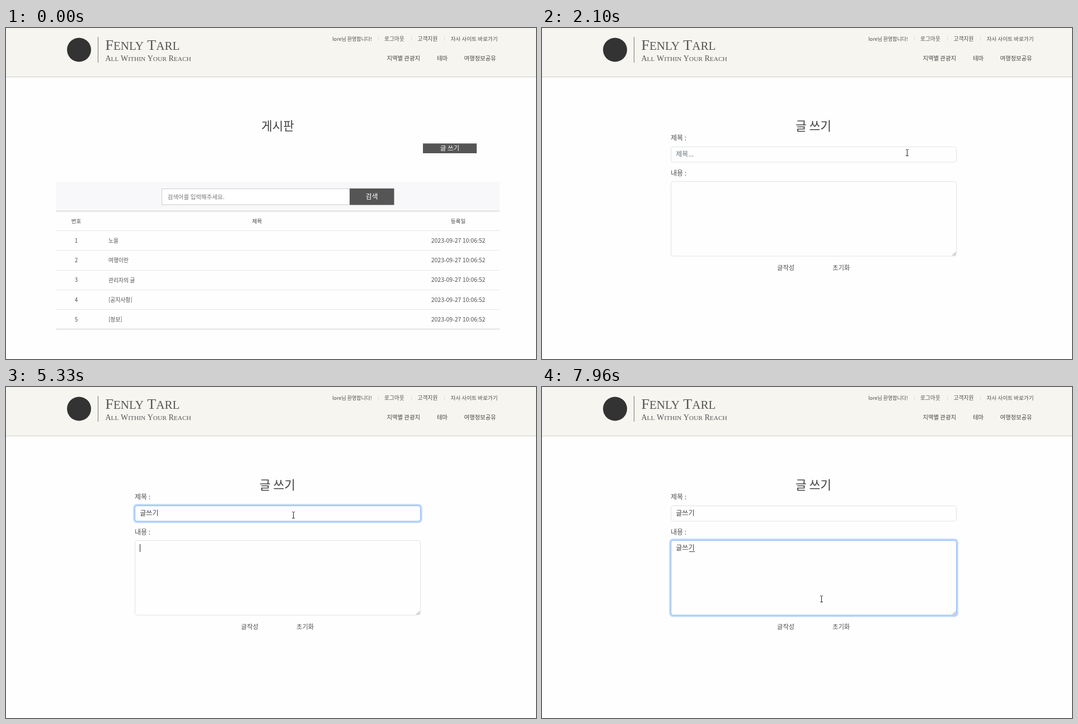
Animation of 947 by 592 pixels, one loop 8 s. Source, as an HTML page with a canvas:

```html
<!DOCTYPE html>
<html lang="ko">
<head>
<meta charset="utf-8">
<title>게시판</title>
<style>
html, body { margin: 0; width: 100%; height: 100%; overflow: hidden; background: #fefefe; }
canvas { display: block; width: 947px; height: 592px; }
</style>
</head>
<body>
<canvas id="stage"></canvas>
<script>
const W = 947, H = 592, LOOP = 8000, STEP = 70;
const KR = '"Noto Sans CJK KR", "Noto Sans CJK", "Noto Sans KR", sans-serif';
const LATIN = '"Noto Sans", "Open Sans", sans-serif';
const SERIF = '"Liberation Serif", "Noto Serif", serif';

const stage = document.getElementById('stage');
const c = stage.getContext('2d');
const dpr = window.devicePixelRatio || 1;
stage.width = W * dpr;
stage.height = H * dpr;

// Moments of the story
const CLICK = 1840, PAGE = 1980, FOCUS = 3230, TAB = 5330;

const titleKeys = [
  [3760, 'ㄱ'], [4190, '그'], [4320, '글'],
  [4520, '글ㅆ'], [4590, '글쓰'], [4660, '글쓱'], [4730, '글쓰기']
];
const bodyKeys = [
  [6200, 'ㄱ'], [6300, '그'], [6400, '글'],
  [6600, '글ㅆ'], [7020, '글쓰'], [7120, '글쓱'], [7220, '글쓰기']
];

const clamp = v => Math.max(0, Math.min(1, v));
const ramp = (t, from, to) => clamp((t - from) / (to - from));
const mix = (a, b, k) => a + (b - a) * k;
const smooth = k => k * k * (3 - 2 * k);
const ticks = (t, from, to) => clamp(Math.floor((t - from) / STEP + 1e-6) * STEP / (to - from));

function typed(keys, t) {
  let value = '';
  for (const [at, s] of keys) if (t >= at) value = s;
  return value;
}

function rect(x, y, w, h, color) {
  c.fillStyle = color;
  c.fillRect(x, y, w, h);
}

function text(s, x, y, size, color = '#505050', align = 'left', weight = 400, family = KR) {
  c.font = `${weight} ${size}px ${family}`;
  c.textAlign = align;
  c.fillStyle = color;
  c.fillText(s, x, y + size * 0.37);
}

function smallCaps(s, x, y, big, small, color) {
  c.textAlign = 'left';
  c.fillStyle = color;
  const run = (part, size) => {
    c.font = `${size}px ${SERIF}`;
    c.fillText(part, x, y);
    x += c.measureText(part).width;
  };
  for (const word of s.toUpperCase().split(' ')) {
    run(word[0], big);
    run(word.slice(1), small);
    x += big * 0.25;
  }
}

function round(x, y, w, h, r) {
  c.beginPath();
  c.roundRect(x, y, w, h, r);
}

function header() {
  rect(0, 0, W, 87, '#f7f5f0');
  rect(0, 87, W, 1, '#cbcac8');
  c.fillStyle = '#333';
  c.beginPath();
  c.arc(130.5, 39, 21.5, 0, 7);
  c.fill();
  rect(164, 16, 1, 46, '#777');
  smallCaps('Fenly Tarl', 177.5, 38.5, 26, 21, '#555');
  smallCaps('All Within Your Reach', 177.5, 58.5, 14, 11.4, '#585858');

  text('lore님 환영합니다!', 583, 19.5, 9);
  text('로그아웃', 676, 19.5, 9.7);
  text('고객지원', 735.5, 19.5, 9.7);
  text('자사 사이트 바로가기', 794.5, 19.5, 9.65);
  for (const x of [665, 724, 783]) rect(x, 16, 1, 7, '#dedcd8');

  text('지역별 관광지', 680.5, 54.5, 10.35, '#444');
  text('테마', 770, 54.5, 10.35, '#444');
  text('여행정보공유', 818.5, 54.5, 10.35, '#444');
}

function board(hover) {
  const g = Math.round(mix(85, 98, hover));
  text('게시판', 485.5, 175, 21.2, '#404040', 'center', 300);
  rect(745, 206.5, 96, 17.5, `rgb(${g},${g},${g})`);
  text('글 쓰기', 793, 215, 11.5, '#fff', 'center');

  rect(89, 275.5, 793, 52, '#f8f8fa');
  rect(278, 287, 336, 29.5, '#ccc');
  rect(279, 288, 335, 27.5, '#fff');
  text('검색어를 입력해주세요.', 288.5, 302, 10.5, '#777');
  rect(614, 287, 79.5, 29.5, '#555');
  text('검색', 653.5, 301.5, 12, '#fff', 'center');

  rect(89, 327, 793, 1, '#ccc');
  text('번호', 125.5, 345, 9.6, '#444', 'center');
  text('제목', 448.5, 345, 9.6, '#444', 'center');
  text('등록일', 808, 345, 9.6, '#444', 'center');

  ['노을', '여행이란', '관리자의 글', '[공지사항]', '[정보]'].forEach((name, i) => {
    const y = 380 + i * 35.3;
    rect(89, Math.round(362 + i * 35.3), 793, 1, '#e4e8e8');
    text(i + 1, 125.5, y, 10, '#505050', 'center');
    text(name, 183, y + 0.5, 9.8);
    text('2023-09-27 10:06:52', 808, y, 10.45, '#505050', 'center');
  });
  rect(89, 538, 793, 1, '#ccc');
}

function field(y, h, focus) {
  if (focus > 0) {
    const s = 2.7 * focus;
    c.fillStyle = `rgba(13,110,253,${0.27 * focus})`;
    round(230 - s, y - s, 511 + 2 * s, h + 2 * s, 4 + s);
    c.fill();
  }
  c.fillStyle = '#fefefe';
  c.strokeStyle = `rgb(${mix(222, 134, focus)},${mix(226, 183, focus)},${mix(230, 254, focus)})`;
  c.lineWidth = 1;
  round(230.5, y + 0.5, 510, h - 1, 4);
  c.fill();
  c.stroke();
}

// Text being composed: the last syllable is underlined
function entry(value, y, composing, caret) {
  text(value, 239.3, y, 12, '#404040');
  const end = 239 + Math.round(value.length * 11.3);
  if (composing && value) rect(end - 10, y + 6, 10, 1, '#404040');
  if (caret) rect(end, y - 7, 1, 14, '#222');
}

function suggestions(alpha) {
  if (alpha <= 0) return;
  c.save();
  c.globalAlpha = alpha;

  // Shadow only outside the panel, so the fading panel stays white
  c.save();
  c.beginPath();
  c.rect(0, 0, W, H);
  c.roundRect(302, 247, 115, 165, 3);
  c.clip('evenodd');
  c.shadowColor = 'rgba(0,0,0,.28)';
  c.shadowBlur = 3 * dpr;
  c.shadowOffsetY = dpr;
  c.fillStyle = '#fefefe';
  round(302, 247, 115, 165, 3);
  c.fill();
  c.restore();

  c.fillStyle = '#fefefe';
  round(302, 247, 115, 165, 3);
  c.fill();
  c.strokeStyle = '#e6e8ec';
  c.lineWidth = 0.8;
  c.beginPath();
  c.moveTo(311, 247);
  c.lineTo(317, 241.5);
  c.lineTo(323, 247);
  c.fill();
  c.stroke();
  ['123', '777', '1', 'df123', '1234', 'ㅇㅇ'].forEach((s, i) =>
    text(s, 311, 263.7 + i * 26.5, i < 5 ? 9.4 : 10, '#444', 'left', 400, i < 5 ? LATIN : KR));
  c.restore();
}

function form(t) {
  const focused = t >= FOCUS;
  const inTitle = focused ? smooth(ramp(t, 3185, 3370)) * (1 - smooth(ramp(t, TAB, 5470))) : 0;
  const inBody = smooth(ramp(t, TAB, 5470));

  text('글 쓰기', 485, 175, 21.4, '#404040', 'center', 300);
  text('제목 :', 230, 197, 12);
  text('내용 :', 230, 260, 12);
  field(212, 28.5, inTitle);
  field(274, 134.5, inBody);
  c.strokeStyle = '#666';
  c.lineWidth = 0.8;
  c.beginPath();
  for (const d of [6, 3]) {
    c.moveTo(739.5 - d, 407);
    c.lineTo(739.5, 407 - d);
  }
  c.stroke();

  const title = typed(titleKeys, t);
  if (!title) text('제목...', 239.3, 226, 12, '#6c757d');
  entry(title, 226, t < 5260, focused && t < 5260);

  const body = typed(bodyKeys, t);
  const blinkOff = (t >= 5870 && t < 6200) || t >= 7750;
  entry(body, 288, true, t >= TAB && !blinkOff);

  text('글작성', 420, 429, 11.3);
  text('초기화', 519, 429, 11.3);
  if (focused) suggestions(1 - ramp(t, 3800, 4040));
}

function pointer(t) {
  if (t < 1880) {
    const k = smooth(ticks(t, 190, 960));
    return [mix(896, 789, k), mix(465, 219, k)];
  }
  if (t < FOCUS + 70) {
    const k = smooth(ticks(t, 1880, 2300));
    return [mix(789, 515, k), mix(219, 227, k)];
  }
  if (t < 7680) {
    const k = ticks(t, 3300, 3440);
    return [mix(515, 513, k), mix(227, 229, k)];
  }
  const k = ticks(t, 7610, 7960), m = 1 - k;
  return [m * m * 513 + 2 * m * k * 650 + k * k * 499, mix(229, 379, smooth(k))];
}

function arrow(x, y) {
  c.beginPath();
  [[0, 0], [0, 11], [2.6, 8.7], [4.4, 12.6], [6, 11.9], [4.3, 8], [7.7, 8]]
    .forEach(([dx, dy]) => c.lineTo(x + dx, y + dy));
  c.closePath();
  c.fillStyle = '#fff';
  c.strokeStyle = '#222';
  c.lineWidth = 0.9;
  c.fill();
  c.stroke();
}

function beam(x, y) {
  x = Math.round(x);
  y = Math.round(y);
  rect(x, y - 5, 1, 11, '#222');
  for (const dy of [-6, 5]) {
    rect(x - 2, y + dy, 2, 1, '#333');
    rect(x + 1, y + dy, 2, 1, '#333');
  }
}

function clickSpot(t, at, x, y) {
  if (t < at || t > at + 200) return;
  c.fillStyle = `rgba(255,255,0,${0.55 * (1 - ramp(t, at + 60, at + 200))})`;
  c.beginPath();
  c.arc(x, y, 9, 0, 7);
  c.fill();
}

function draw(t) {
  c.setTransform(dpr, 0, 0, dpr, 0, 0);
  rect(0, 0, W, H, '#fefefe');
  header();
  const [x, y] = pointer(t);
  const over = t >= 190 && x > 745 && x < 841 && y > 206 && y < 224;
  if (t < PAGE) board(over ? 1 : 0);
  else form(t);

  clickSpot(t, CLICK, 788, 218);
  clickSpot(t, FOCUS, 514, 227);
  if (t < 190) return;
  if (t > PAGE && x < 741 && y > 212) beam(x, y);
  else arrow(x, y);
}

function loop() {
  draw(performance.now() % LOOP);
  requestAnimationFrame(loop);
}
loop();
</script>
</body>
</html>
```
